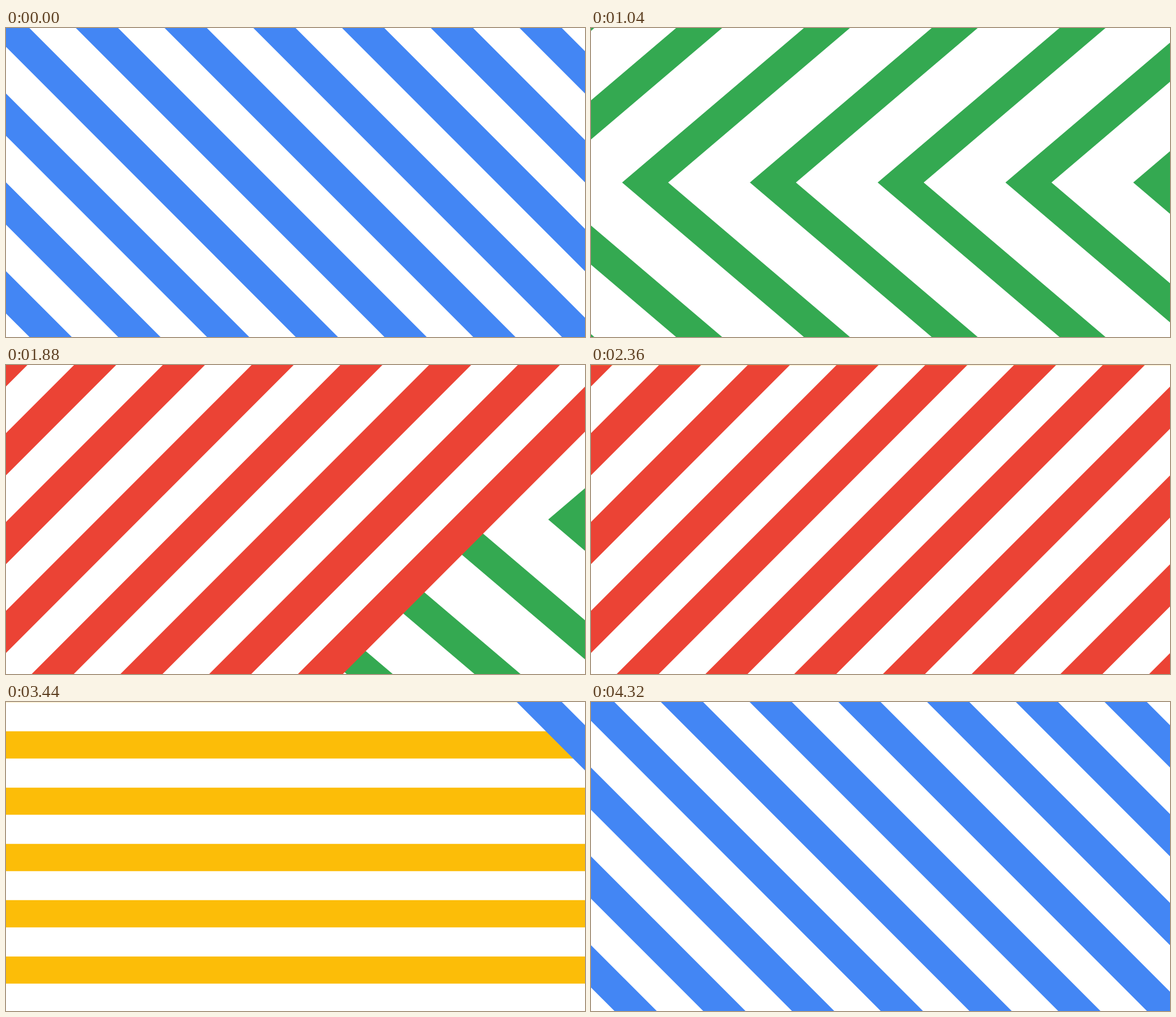
Animation of 1000 by 533 pixels, one loop 4360 ms. Source, as an HTML page with a canvas:

```html
<!DOCTYPE html>
<html lang="en">
<head>
<meta charset="utf-8">
<title>Stripe wipes</title>
<style>
  html, body { margin: 0; width: 100%; height: 100%; overflow: hidden; background: #fff; }
  canvas { display: block; width: 100%; height: 100%; }
</style>
</head>
<body>
<canvas id="stage" width="1000" height="533"></canvas>
<script>
const W = 1000, H = 533, LOOP = 4360, STEP = 80, FAR = 3000;
const ctx = document.getElementById("stage").getContext("2d");

// Each front is the polygon a wipe has covered once its edge reaches s.
const fronts = {
  fromTopRight: s => [[s, 0], [s + H, H], [FAR, H], [FAR, 0]],
  fromRight: s => [[s + 314, 0], [s, H / 2], [s + 314, H], [FAR, H], [FAR, 0]],
  fromTopLeft: s => [[s, 0], [s - H, H], [-FAR, H], [-FAR, 0]],
  fromTop: s => [[0, 0], [W, 0], [W, s], [0, s]]
};

// first: edge of the first stripe; period and band are signed along the motion;
// lead: extra width of the newest stripe.
const blue = { front: fronts.fromTopRight, color: "#4386f4", start: 3440,
  first: 887, period: -153.27, band: -73, lead: -5, last: 10 };
const green = { front: fronts.fromRight, color: "#34a951", start: 200,
  first: 936.5, period: -220.7, band: -79.5, lead: 0, last: 6 };
const red = { front: fronts.fromTopLeft, color: "#eb4335", start: 1280,
  first: 37, period: 153.27, band: 72.7, lead: 5, last: 10 };
const yellow = { front: fronts.fromTop, color: "#fcbd08", start: 2360,
  first: 0.35, period: 97.1, band: 46.9, lead: 0, last: 6 };

function fill(points, color) {
  ctx.fillStyle = color;
  ctx.beginPath();
  for (const [x, y] of points) ctx.lineTo(x, y);
  ctx.fill();
}

// Nested fronts, newest first, leave alternating colour and white bands.
function drawStripes(layer, newest) {
  for (let i = newest; i >= 0; i--) {
    const edge = layer.first + layer.period * i;
    const lead = i === newest ? layer.lead : 0;
    fill(layer.front(edge + lead), layer.color);
    const inner = edge - layer.band;
    if (layer !== yellow || inner > 0) fill(layer.front(inner), "#fff");
  }
}

function render(time) {
  ctx.fillStyle = "#fff";
  ctx.fillRect(0, 0, W, H);
  drawStripes(blue, blue.last);
  for (const layer of [green, red, yellow, blue]) {
    const newest = Math.floor((time - layer.start) / STEP);
    drawStripes(layer, Math.min(newest, layer.last));
  }
}

function tick() {
  render(performance.now() % LOOP);
  requestAnimationFrame(tick);
}
tick();
</script>
</body>
</html>
```
